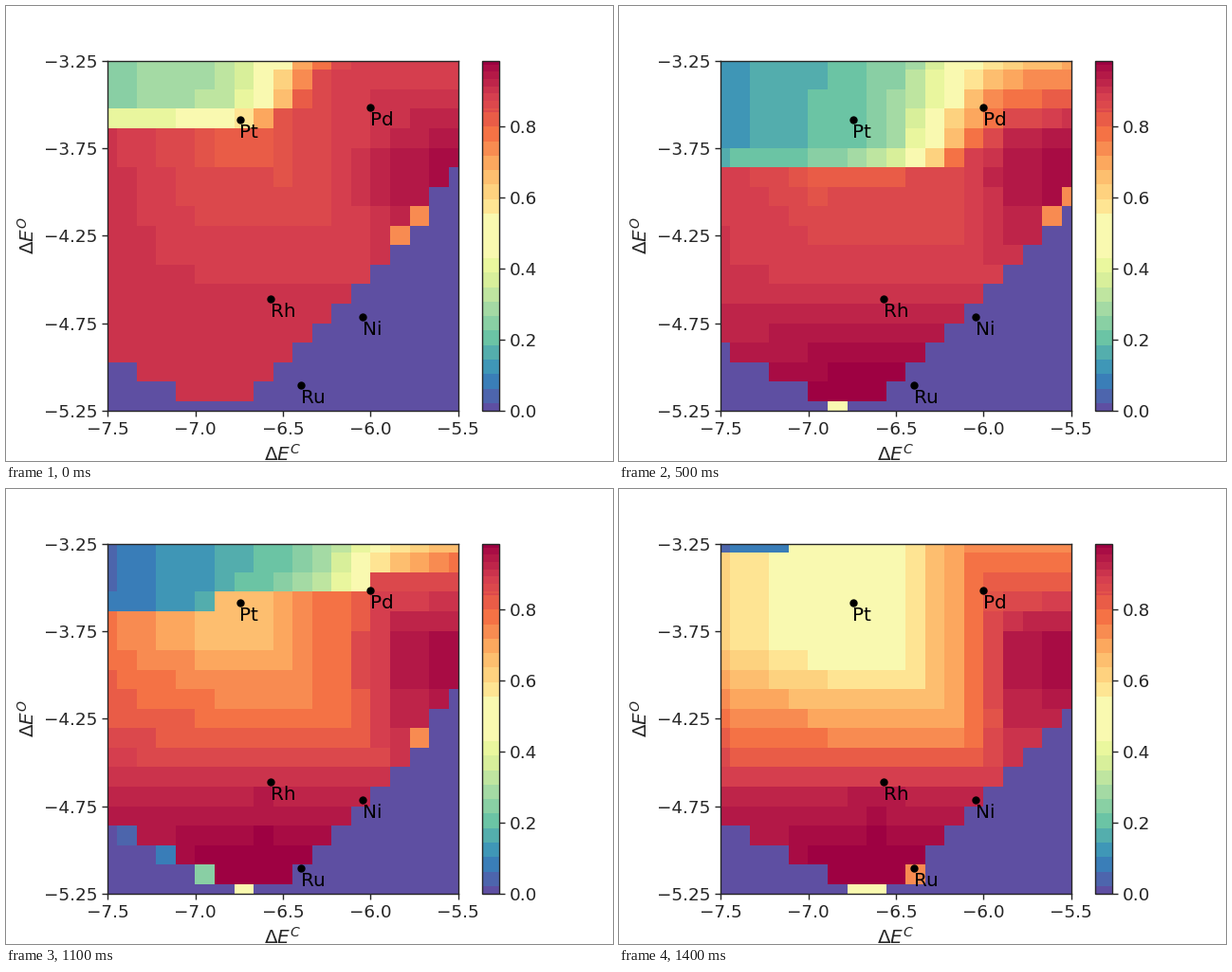
A matplotlib script that plays this animation: 640x480 px, repeating every 1.5 s.

```python
import numpy as np
import matplotlib.pyplot as plt
from matplotlib.animation import FuncAnimation
from matplotlib.colors import ListedColormap

N = 19                # grid points per axis
FRAMES = 15
VMAX = 0.985
TOP_LEVEL = 24        # field values run from 0 to this
INK = "0.15"

METALS = {"Pt": (-6.746, -3.588), "Pd": (-6.002, -3.519),
          "Rh": (-6.568, -4.613), "Ni": (-6.044, -4.715),
          "Ru": (-6.396, -5.105)}

ROW, COL = np.mgrid[0:N, 0:N]


def warm_field(u):
    """Hot plateau with an L-shaped basin that deepens with time u."""
    depth = 1.6 + 9 * u ** 3
    down = np.clip((12.5 - ROW) / 7.5, 0, 1)
    left = 1 - (1 - 0.7 * u) * np.clip(1 - COL / 6, 0, 1)
    right = np.clip((15 - COL) / 7, 0, 1)
    top_right = 0.35 * (1 - ROW / 4.5)
    basin = depth * np.minimum(down * left, np.maximum(right, top_right))

    ridge = 1.4 * np.clip((COL - 12) / 5, 0, 1) * np.exp(-((ROW - 6) / 3) ** 2)
    tongue = 0.7 + 0.5 * np.exp(-((COL - 8) / 4) ** 2)
    rise = 0.42 * np.clip(ROW - 11.5, 0, None) * (1 - np.exp(-6 * u))
    return 22 - basin + ridge + rise * tongue


def cool_field(u):
    """Cool upper left, climbing to the right along a logistic step."""
    base = 6.3 * np.exp(-2 * u) + (0.15 + 0.35 * u) * COL
    height = 7.5 + 7 * np.exp(-5 * u) + 1.8 * ROW
    center = 9.5 + 4.2 * np.sqrt(u) - 0.15 * ROW
    return base + height / (1 + np.exp((center - COL) / 1.2))


def mix_phases(u):
    rows = np.rint(4.1 + 11 * u - 13.8 * u ** 2 - 0.2 * u ** 2 * COL)
    cool = cool_field(u) + 3.5 * np.exp(-3 * u) * (ROW == rows - 1)
    warm = warm_field(u)
    return np.where(ROW < rows, np.minimum(cool, warm), warm)


def cut_right(field, u):
    """Empty the cells past a diagonal front; fresh cells lag behind."""
    front = 24.84 + 2.25 * u ** 0.68 + (ROW - 6) / 12
    limit = np.floor(front)
    fresh = (front - limit < 0.16) & (ROW + COL == limit - 1)
    field[fresh] = 18
    field[ROW + COL >= limit] = 0


def cut_left(field, u):
    """Empty the lower left corner; cells about to go fade on its edge."""
    shift = 0.4 + 1.6 * u
    edge = np.rint(shift) + 2 * (ROW - 15)
    corner = ROW >= 15
    field[corner & (COL < edge)] = 0
    if np.rint(shift) - shift > 0.2:
        fading = corner & (COL == edge - 1)
        field[fading] = 2.4 ** (ROW[fading] - 15)


def make_field(frame):
    u = frame / (FRAMES - 1)
    field = mix_phases(u)
    cut_right(field, u)
    cut_left(field, u)
    field[-1] = 0
    if u > 0.25:
        start, stop = np.rint([5.4 + 1.7 * u, 6.1 + 2.9 * u]).astype(int)
        field[-1, start:stop] = 12
    return np.clip(field, 0, TOP_LEVEL) / TOP_LEVEL * VMAX


def stepped_cmap():
    """Spectral in steps, finer among the reds, one flat pale middle."""
    t = np.linspace(0, 1, 512)
    steps = np.where(t > 0.86, np.rint(t * 48) / 48, np.rint(t * 24) / 24)
    colors = plt.get_cmap("Spectral_r")(steps)
    colors[np.abs(steps - 0.5) < 0.05, :3] = np.array([249, 249, 176]) / 255
    return ListedColormap(colors)


plt.rcParams.update({
    "font.family": "DejaVu Sans", "axes.edgecolor": INK,
    "axes.labelcolor": INK, "axes.linewidth": 1, "axes.labelsize": 14.4})
for axis in ("xtick", "ytick"):
    plt.rcParams.update({
        f"{axis}.color": INK, f"{axis}.labelsize": 13.2,
        f"{axis}.major.width": 1, f"{axis}.major.size": 4.5})

fig = plt.figure(figsize=(6.4, 4.8), dpi=100)
ax = fig.add_axes([107.2 / 640, 0.11, 369.6 / 640, 0.77])
cax = fig.add_axes([501.6 / 640, 0.11, 18.48 / 640, 0.77])

half = 1 / (N - 1)
image = ax.imshow(make_field(0)[::-1], cmap=stepped_cmap(), vmin=0, vmax=VMAX,
                  interpolation="nearest", aspect="auto", origin="lower",
                  extent=(-7.5 - half, -5.5 + half, -5.25 - half, -3.25 + half))
ax.set(xlim=(-7.5, -5.5), ylim=(-5.25, -3.25),
       xticks=np.arange(-7.5, -5.4, 0.5), yticks=np.arange(-5.25, -3.2, 0.5),
       xlabel=r"$\Delta E^C$", ylabel=r"$\Delta E^O$")

for name, (x, y) in METALS.items():
    ax.plot(x, y, "o", color="black", markersize=5)
    ax.annotate(name, (x, y), xytext=(-0.5, -19), textcoords="offset pixels",
                fontsize=14.4, color="black", ha="left", va="baseline")

fig.colorbar(image, cax=cax, ticks=np.arange(0, 0.9, 0.2))


def update(frame):
    image.set_data(make_field(frame)[::-1])
    return [image]


anim = FuncAnimation(fig, update, frames=FRAMES, interval=100, repeat=True)
plt.show()
```
